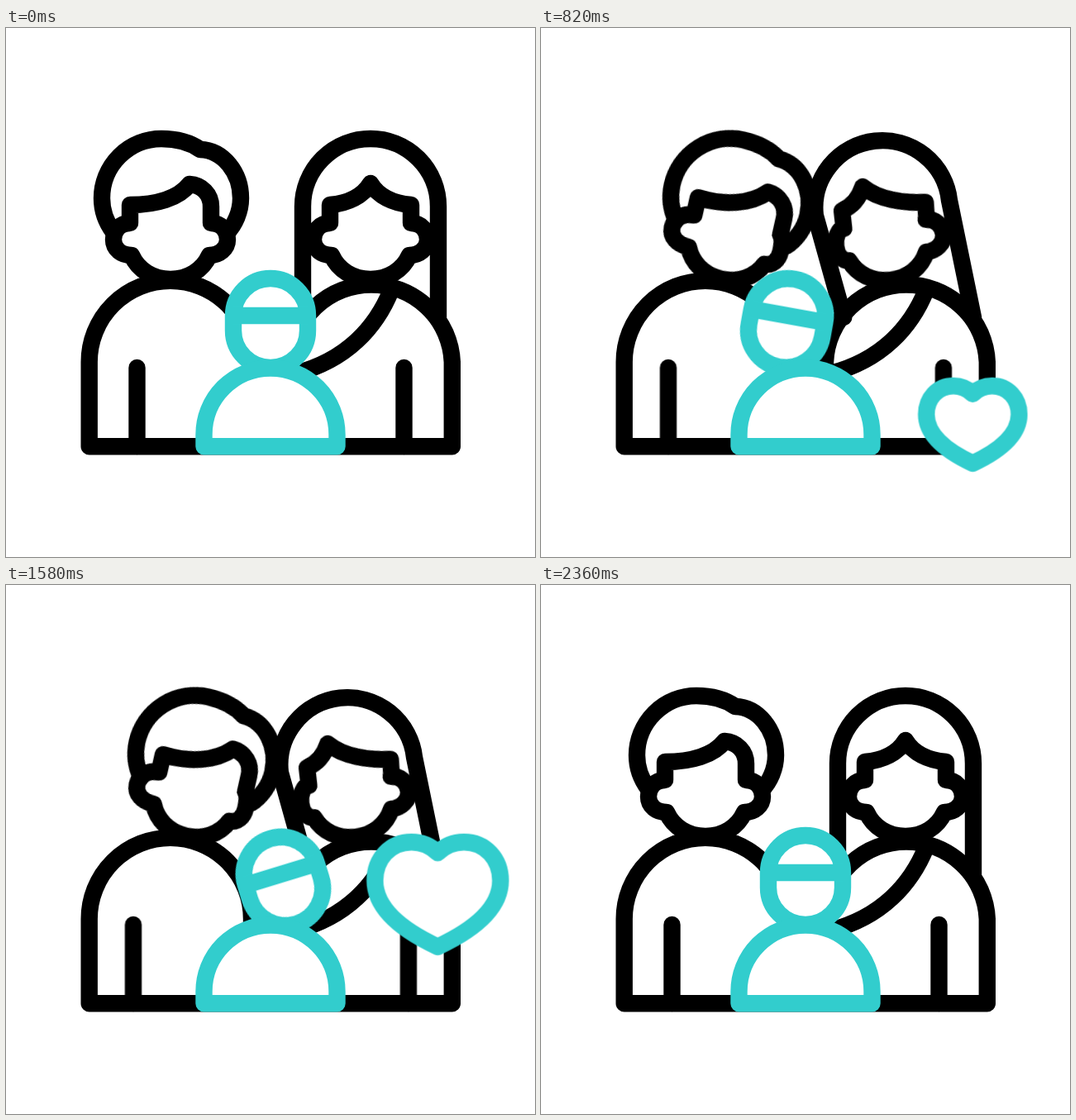
Write an HTML page that moves like this. It is 640x640 px and loops after 2.4 s.

```html
<!DOCTYPE html>
<html lang="en">
<head>
<meta charset="utf-8">
<title>Family</title>
<style>
  :root { --snap: cubic-bezier(.77, 0, .23, 1); --soft: cubic-bezier(.33, 0, .67, 1); }
  html, body { margin: 0; width: 100%; height: 100%; overflow: hidden; background: #fff; }
  svg { display: block; width: 100%; height: 100%; }
  path, rect {
    fill: none; stroke: #000; stroke-width: 20.4;
    stroke-linecap: round; stroke-linejoin: round;
  }
  .teal path, .teal rect { fill: #fff; stroke: #32cdcd; }
  .teal .band { stroke-linecap: butt; }

  /* Parents lean in and back */
  .lean { animation: 1.2s var(--snap) infinite alternate; }
  .dad { transform-origin: 210px 390px; animation-name: dad; }
  .mum { transform-origin: 441px 470px; animation-name: mum; }
  .dad-arm { animation-name: dad-arm; }
  .mum-arm { animation-name: mum-arm; }
  .dad-face { animation-name: dad-face; }
  .mum-face { animation-name: mum-face; }
  .dad-fringe { animation-name: dad-fringe; }
  .mum-fringe { animation-name: mum-fringe; }
  .mum-hair { animation-name: mum-hair; }
  @keyframes dad { to { transform: rotate(14deg); } }
  @keyframes mum { to { transform: rotate(-7deg); } }
  @keyframes dad-arm { to { transform: translateX(-5px); } }
  @keyframes mum-arm { to { transform: translateX(6px); } }
  @keyframes dad-face {
    from { d: path("M150 236C137 236 130 246 130 256C130 268 140 275 152 275C160 293 178 304 199 304C220 304 238 293 246 275C258 275 268 267 268 256C268 246 261 236 248 236"); }
    to { d: path("M150 236C135 236 127 246 127 256C127 268 138 275 152 275C160 293 178 304 199 304C220 304 238 293 246 275C255 275 261 267 261 256C261 246 260 240 258 236"); }
  }
  @keyframes mum-face {
    from { d: path("M392 236C379 236 372 246 372 256C372 268 382 275 394 275C402 293 420 304 441 304C462 304 480 293 488 275C500 275 510 267 510 256C510 246 503 236 490 236"); }
    to { d: path("M392 236C385 236 381 246 381 256C381 268 387 275 394 275C402 293 420 304 441 304C462 304 480 293 488 275C500 275 511 267 511 256C511 246 504 236 492 236"); }
  }
  @keyframes dad-fringe {
    from { d: path("M150 235L150 214C182 214 209 206 222 189C237 190 248 201 248 216L248 235"); }
    to { d: path("M150 235L150 214C184 217 214 208 232 189C247 190 258 201 258 216L258 236"); }
  }
  @keyframes mum-fringe {
    from { d: path("M392 235L392 214C414 212 432 203 441 188C450 203 468 212 490 214L490 235"); }
    to { d: path("M392 235L392 214C404 210 412 202 418 188C436 206 468 214 494 215L493 235"); }
  }
  /* The radius is below half the chord, so the arc stays a semicircle */
  @keyframes mum-hair {
    from { d: path("M359 350L359 216A80 80 0 0 1 523 216L523 350"); }
    to { d: path("M367 350L329 228A80 80 0 0 1 491 208L523 350"); }
  }

  .kid-head { transform-origin: 320px 357px; animation: sway 2.4s var(--snap) infinite; }
  @keyframes sway {
    0%, 98.3%, 100% { transform: translate(0, 0) rotate(0deg); }
    32.1% { transform: translate(-22.5px, 0) rotate(10.3deg); }
    66.25% { transform: translate(15.5px, 1.5px) rotate(-17deg); }
  }

  /* Heart rises while beating */
  .heart { animation: rise 2.4s linear infinite, show 2.4s step-end infinite; }
  .heart path { vector-effect: non-scaling-stroke; animation: beat 2.4s var(--soft) infinite; }
  @keyframes rise {
    0%, 11.7% { transform: translate(522.3px, 536px); }
    20.83% { transform: translate(522.3px, 513px); }
    34.17% { transform: translate(522.3px, 480px); }
    49.17% { transform: translate(522.3px, 431.5px); }
    65.83% { transform: translate(522.3px, 374.5px); }
    83.33% { transform: translate(522.3px, 326.5px); }
    90.4%, 100% { transform: translate(522.3px, 312px); }
  }
  @keyframes show {
    0%, 90.4%, 100% { opacity: 0; }
    11.7% { opacity: 1; }
  }
  @keyframes beat {
    0%, 11.7%, 90.4%, 100% { transform: scale(0); }
    24.6% { transform: scale(1); }
    35.8%, 58.3% { transform: scale(.67); }
    47.1% { transform: scale(1.04); }
    70.2% { transform: scale(1.045); animation-timing-function: cubic-bezier(.7, 0, .95, .45); }
  }
</style>
</head>
<body>
<svg viewBox="0 0 640 640">
  <path d="M297 506.300V404A98 98 0 0 0 100.700 404V506.300H539.800V404A98 98 0 0 0 344 404V506.300"/>
  <path d="M466 317C448 362 412 402 350 418"/>
  <path class="lean dad-arm" d="M158.500 411V506"/>
  <path class="lean mum-arm" d="M481.500 411V506"/>

  <path class="lean mum-hair" d="M359 350L359 216A80 80 0 0 1 523 216L523 350"/>
  <g class="lean mum">
    <path class="lean mum-face"/>
    <path class="lean mum-fringe"/>
  </g>
  <g class="lean dad">
    <path d="M130 247C121 235 116 221 116 206A72 72 0 0 1 188 134C206 134 222 138 235 147C263 148 284 175 284 206C284 222 277 238 267 248"/>
    <path class="lean dad-face"/>
    <path class="lean dad-fringe"/>
  </g>

  <g class="teal">
    <g class="kid-head">
      <rect x="275" y="303" width="90" height="108" rx="45"/>
      <path class="band" d="M275 348H365"/>
    </g>
    <path d="M239.500 506.300V492A80.500 80.500 0 0 1 400.500 492V506.300Z"/>
    <g class="heart">
      <path d="M0 -54C-10 -64 -22 -68 -34 -68C-62 -68 -81.500 -46 -81.500 -18C-81.500 10 -60 40 0 68C60 40 81.500 10 81.500 -18C81.500 -46 62 -68 34 -68C22 -68 10 -64 0 -54Z"/>
    </g>
  </g>
</svg>
</body>
</html>
```
